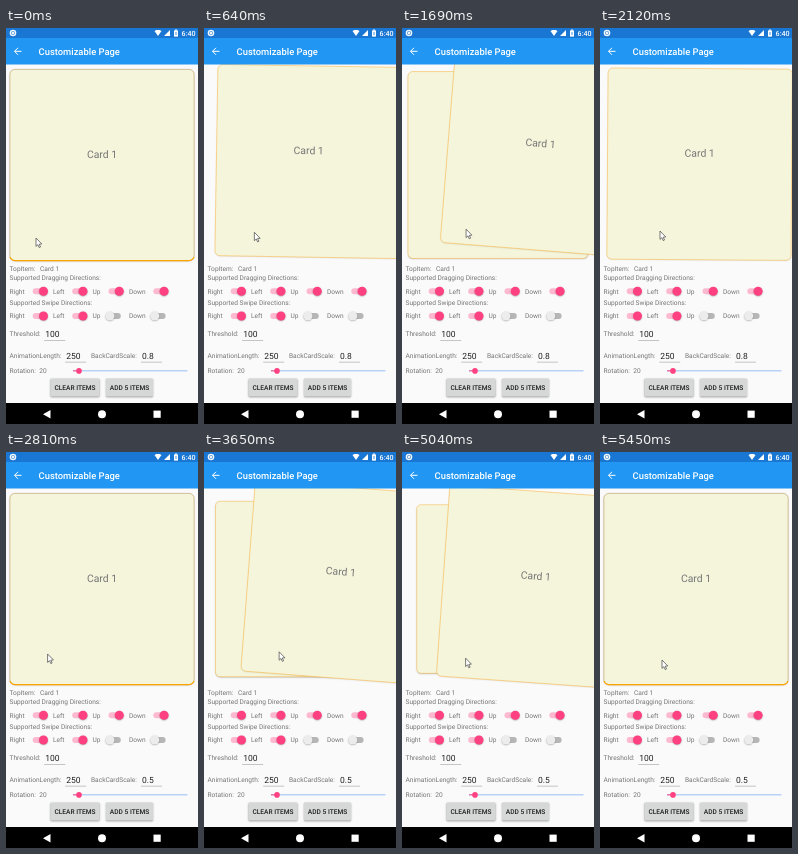
An HTML page with a canvas that plays this animation: 192x396 px, repeating every 5.5 s.

```html
<!DOCTYPE html>
<html lang="en">
<head>
<meta charset="utf-8">
<title>Customizable Page</title>
<style>
html, body { margin: 0; width: 100%; height: 100%; overflow: hidden; background: #fafafa; }
canvas { display: block; width: 192px; height: 396px; }
</style>
</head>
<body>
<canvas id="stage"></canvas>
<script>
const W = 192, H = 396, LOOP = 5500;
const canvas = document.getElementById('stage');
const ctx = canvas.getContext('2d');
const ratio = window.devicePixelRatio || 1;
canvas.width = Math.round(W * ratio);
canvas.height = Math.round(H * ratio);

const FONT = 'Roboto, "Noto Sans", sans-serif';
const PINK = '#ff4081', GREY = '#757575', BEIGE = '#f5f5dc', ORANGE = '#ffa500';
const CARD = { cx: 96, cy: 137, w: 185, h: 192, r: 5 };
const CUT = 2380;        // the scale entry changes here
const SPRING_MS = 250;
const REACH = 48.5;      // drag distance at which the back card is full size
const TILT = 0.11;       // degrees per dragged pixel

// The pointer goes grab -> hold -> drop; the card follows it with a lag.
const firstDrag = {
  grab: { x: 30, y: 210 }, hold: { x: 74, y: 198 }, drop: { x: 60, y: 203 },
  start: 360, pull: 590, back: 1500, ease: 300, release: 2050, lag: 110
};
const secondDrag = {
  grab: { x: 29, y: 207 }, hold: { x: 86.5, y: 196.8 }, drop: { x: 62, y: 208 },
  start: 3114, pull: 760, back: 4540, ease: 600, release: 5170, lag: 60
};
const approach = { from: { x: 80, y: 219 }, start: 2630, time: 360, arc: 8 };

const progress = (t, start, time) => Math.min(1, Math.max(0, (t - start) / time));
const mix = (a, b, k) => a + (b - a) * k;
const sineInOut = p => 0.5 - 0.5 * Math.cos(Math.PI * p);
const quadOut = p => p * (2 - p);

function springOut(p) {
  const s = 1.70158, q = p - 1;
  return q * q * ((s + 1) * q + s) + 1;
}

const currentDrag = t => t < CUT ? firstDrag : secondDrag;

function dragPoint(d, t) {
  const returning = t >= d.back;
  const p = returning ? progress(t, d.back, d.ease) : progress(t, d.start, d.pull);
  const [from, to] = returning ? [d.hold, d.drop] : [d.grab, d.hold];
  return { x: mix(from.x, to.x, sineInOut(p)), y: mix(from.y, to.y, p) };
}

function pointerAt(t) {
  if (t < CUT || t >= secondDrag.start) return dragPoint(currentDrag(t), t);
  const { from, start, time, arc } = approach;
  const p = progress(t, start, time), k = quadOut(p);
  return {
    x: mix(from.x, secondDrag.grab.x, k),
    y: mix(from.y, secondDrag.grab.y, k) - arc * Math.sin(Math.PI * p)
  };
}

function cardOffset(t) {
  const d = currentDrag(t);
  const point = dragPoint(d, Math.min(t, d.release) - d.lag);
  const left = 1 - springOut(progress(t, d.release, SPRING_MS));
  return { dx: (point.x - d.grab.x) * left, dy: (point.y - d.grab.y) * left };
}

function text(str, x, y, size = 6.6, color = GREY, weight = 400, align = 'left') {
  ctx.font = `${weight} ${size}px ${FONT}`;
  ctx.textAlign = align;
  ctx.fillStyle = color;
  ctx.fillText(str, x, y);
}

function rect(x, y, w, h, color) {
  ctx.fillStyle = color;
  ctx.fillRect(x, y, w, h);
}

function disc(x, y, r, color) {
  ctx.fillStyle = color;
  ctx.beginPath();
  ctx.arc(x, y, r, 0, Math.PI * 2);
  ctx.fill();
}

function shape(points, color) {
  ctx.fillStyle = color;
  ctx.beginPath();
  points.forEach(([x, y]) => ctx.lineTo(x, y));
  ctx.closePath();
  ctx.fill();
}

function rounded(x, y, w, h, r) {
  ctx.beginPath();
  ctx.roundRect(x, y, w, h, r);
}

function shadow(blur, dy, alpha) {
  ctx.shadowColor = `rgba(0,0,0,${alpha})`;
  ctx.shadowBlur = blur * ratio;
  ctx.shadowOffsetY = dy * ratio;
}

function noShadow() {
  ctx.shadowColor = 'transparent';
}

function outline(color, width) {
  ctx.strokeStyle = color;
  ctx.lineWidth = width;
  ctx.stroke();
}

function drawCard(label, dx, dy, scale) {
  const { cx, cy, w, h, r } = CARD;
  const upright = Math.abs(dx) < 0.2;
  const resting = upright && scale === 1;
  ctx.save();
  ctx.translate(cx + dx, cy + dy);
  ctx.rotate(dx * TILT * Math.PI / 180);
  ctx.scale(scale, scale);
  const path = () => rounded(-w / 2 + 0.4, -h / 2 + 0.4, w - 0.8, h - 0.8, r);
  path();
  shadow(1.6, 0.7, upright ? 0.28 : 0.1);
  ctx.fillStyle = BEIGE;
  ctx.fill();
  noShadow();
  outline(resting ? '#cdb483' : '#fbbd50', resting ? 0.8 : 0.6);
  if (resting) {
    ctx.save();
    ctx.beginPath();
    ctx.rect(-w / 2 - 1, h / 2 - 4, w + 2, 6);
    ctx.clip();
    path();
    outline(ORANGE, 1.2);
    ctx.restore();
  }
  text(label, 0, -7.4, 10.4, GREY, 400, 'center');
  ctx.restore();
}

function drawCards(t) {
  const { dx, dy } = cardOffset(t);
  const base = t < CUT ? 0.8 : 0.5;
  const pull = Math.min(1, Math.hypot(dx, dy) / REACH);
  ctx.save();
  ctx.beginPath();
  ctx.rect(0, 36, W, 200);
  ctx.clip();
  if (pull > 0) drawCard('Card 2', 0, 0, mix(base, 1, pull));
  drawCard('Card 1', dx, dy, 1);
  ctx.restore();
}

function drawHeader() {
  rect(0, 0, W, 10, '#1976d2');
  rect(0, 10, W, 26.5, '#2196f3');
  disc(7, 5, 3.3, '#f2f7fc');
  disc(7, 5, 2, '#5b9bdb');
  disc(7, 5, 1.2, '#f2f7fc');
  shape([[148.5, 3], [150.5, 2], [153.5, 2], [155.5, 3], [152, 8]], '#fff');
  shape([[158, 8], [164, 8], [164, 2]], '#fff');
  rect(168, 2.4, 4, 6.2, '#fff');
  rect(169, 1.5, 2, 1, '#fff');
  rect(169.6, 4, 0.8, 3, '#1976d2');
  text('6:40', 189.6, 7.6, 7.1, '#fff', 500, 'right');

  ctx.beginPath();
  ctx.moveTo(15.5, 23.3);
  ctx.lineTo(8.6, 23.3);
  ctx.moveTo(12, 19.8);
  ctx.lineTo(8.5, 23.3);
  ctx.lineTo(12, 26.8);
  outline('#fff', 1);
  text('Customizable Page', 32.6, 26.7, 9.4, '#fff', 500);
}

function drawSwitch(x, y, on) {
  rounded(x, y - 3, 12.3, 6, 3);
  ctx.fillStyle = on ? '#fcb9cf' : '#b6b6b6';
  ctx.fill();
  shadow(1.5, 0.6, 0.35);
  disc(x + (on ? 10.8 : 1.5), y, 4.5, on ? PINK : '#ececec');
  noShadow();
}

function drawSwitchRow(y, verticalOn) {
  const row = [
    ['Right', 3.5, 26.7, true], ['Left', 47, 66.2, true],
    ['Up', 86.5, 102.5, verticalOn], ['Down', 123, 147.3, verticalOn]
  ];
  for (const [name, x, switchX, on] of row) {
    text(name, x, y + 2.3);
    drawSwitch(switchX, y, on);
  }
}

function drawEntry(value, x, y) {
  text(value, x, y, 8.5, '#212121');
  rect(x - 1, y + 3.1, 21, 0.6, '#a0a0a0');
}

function drawButton(label, x, w) {
  shadow(1.8, 0.8, 0.4);
  rounded(x, 350.5, w, 18, 1);
  ctx.fillStyle = '#d6d7d7';
  ctx.fill();
  noShadow();
  text(label, x + w / 2, 361.8, 6.6, '#1c1c1c', 500, 'center');
}

function drawControls(t) {
  text('TopItem:', 3.5, 242.7);
  text('Card 1', 34, 242.7);
  text('Supported Dragging Directions:', 3.5, 252.2);
  drawSwitchRow(263.3, true);
  text('Supported Swipe Directions:', 3.5, 277);
  drawSwitchRow(288, false);

  text('Threshold:', 3.5, 308.3);
  drawEntry('100', 39.2, 309);
  text('AnimationLength:', 3.5, 330);
  drawEntry('250', 60.2, 330.7);
  text('BackCardScale:', 85, 330);
  drawEntry(t < CUT ? '0.8' : '0.5', 136, 330.7);

  text('Rotation:', 3.5, 345.3);
  text('20', 33.2, 345.3);
  rect(67, 342.4, 114.5, 0.9, '#8fb6f3');
  rect(67, 342.4, 6, 0.9, PINK);
  disc(73, 342.9, 2.8, PINK);

  drawButton('CLEAR ITEMS', 44.5, 49);
  drawButton('ADD 5 ITEMS', 100, 47);
}

function drawNavBar() {
  rect(0, 375, W, 21, '#000');
  shape([[37, 386.2], [44.5, 382], [44.5, 390.4]], '#fff');
  disc(96, 386.2, 4, '#fff');
  rect(147.5, 382.6, 7.2, 7.2, '#fff');
}

function drawPointer(t) {
  const { x, y } = pointerAt(t);
  ctx.save();
  ctx.translate(x, y);
  shape([[0, 0], [0, 8.4], [1.9, 6.7], [3.2, 9.6], [4.5, 9], [3.2, 6.2], [5.8, 6]], '#fff');
  ctx.lineJoin = 'round';
  outline('#444', 0.7);
  ctx.restore();
}

function render(now) {
  const t = now % LOOP;
  ctx.setTransform(ratio, 0, 0, ratio, 0, 0);
  ctx.textRendering = 'geometricPrecision';
  rect(0, 0, W, H, '#fafafa');
  drawCards(t);
  drawHeader();
  drawControls(t);
  drawNavBar();
  drawPointer(t);
}

const start = performance.now();
function tick() {
  render(performance.now() - start);
  requestAnimationFrame(tick);
}
tick();
</script>
</body>
</html>
```
